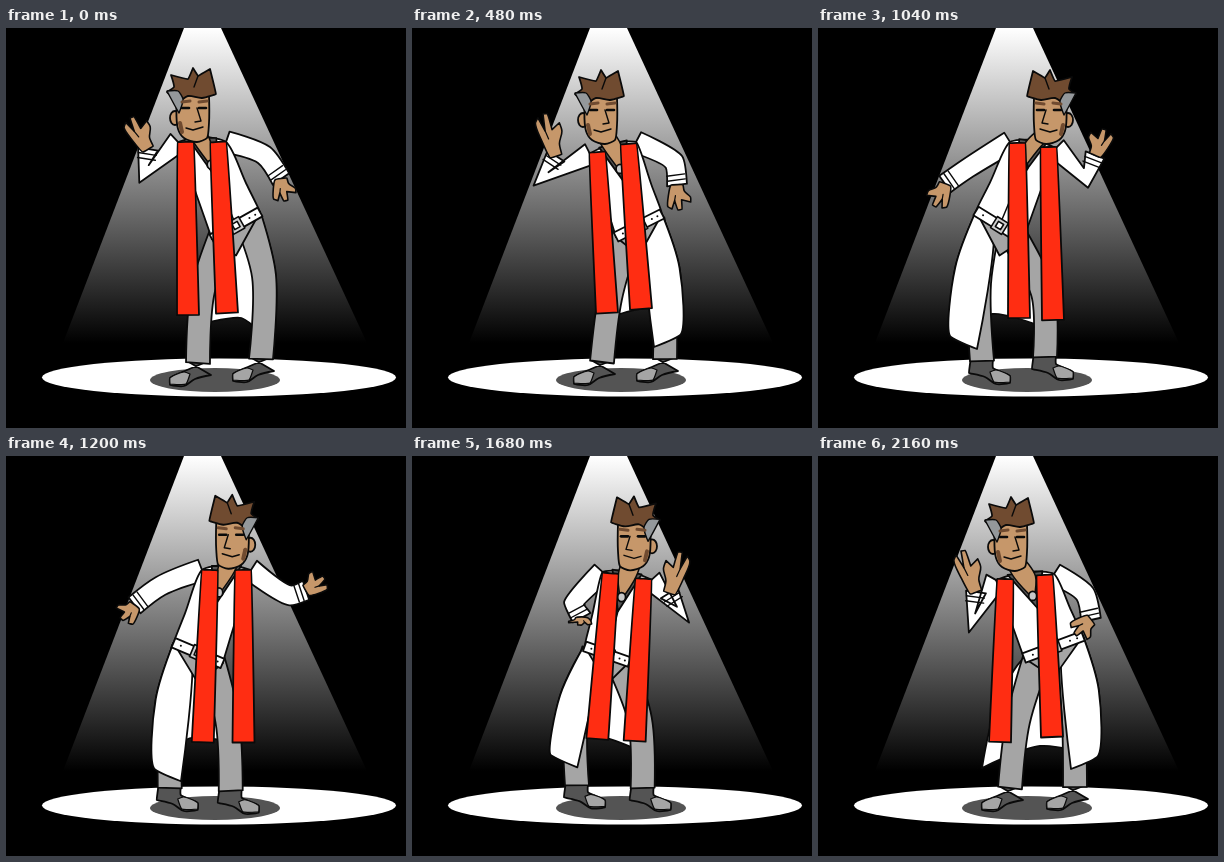
These frames come from a looping animation (400 px wide and 400 px high, 2240 ms). An HTML page with a canvas:

```html
<!DOCTYPE html>
<html lang="en">
<head>
<meta charset="utf-8">
<title>Spotlight dance</title>
<style>
html, body { margin: 0; width: 100%; height: 100%; overflow: hidden; background: #000; }
canvas { display: block; }
</style>
</head>
<body>
<canvas id="stage" width="400" height="400"></canvas>
<script>
const ctx = document.getElementById('stage').getContext('2d');
const STEP = 80, STEPS = 28, AXIS = 208;
const INK = '#0a0a0a', WHITE = '#fff', RED = '#ff2d12', GREY = '#a5a5a5',
  DARK = '#545454', SKIN = '#c6976a', HAIR = '#704b30';

const pts = s => s.split(' ').map(p => p.split(',').map(Number));
const lerp = (a, b, t) => a.map((v, i) => v + (b[i] - v) * t);
const add = (p, x, y) => [p[0] + x, p[1] + y];

// Every joint is a [left, right] pair.
const JOINTS = ['shoulder', 'elbow', 'wrist', 'tip', 'hip', 'knee', 'foot', 'scarf', 'hem'];

function pose(style, head, ...pairs) {
  const p = { style, head };
  JOINTS.forEach((name, i) => p[name] = pts(pairs[i]));
  return p;
}

// face and toe are directions, flap is the side whose coat front hides the leg.
const leanLeft = pose({ face: 1, toe: -1 }, [187, 87],
  '172,114 220,114', '138,146 258,127', '142,121 275,151', '124,90 278,173',
  '206,211 254,184', '197,262 258,248', '192,333 255,329', '182,287 221,285', '203,294 268,318');

const palmLeft = pose({ face: 1, toe: -1, flap: 'R' }, [189, 89],
  '178,126 224,114', '129,151 262,134', '144,128 265,157', '131,86 266,182',
  '204,209 250,186', '198,270 252,270', '190,332 253,329', '195,285 229,281', '204,287 269,306');

const clapRight = pose({ face: 1, toe: 0.6, clap: true }, [211, 81],
  '184,122 236,122', '181,172 237,174', '203,169 213,172', '198,137 206,138',
  '182,203 234,203', '150,248 262,248', '167,328 247,326', '190,292 229,292', '178,312 296,293');

const leanRight = pose({ face: -1, toe: 1, flap: 'L' }, [232, 89],
  '192,114 238,120', '150,140 268,150', '127,156 277,127', '118,179 288,102',
  '158,183 205,212', '161,255 225,265', '164,331 227,327', '201,290 235,292', '132,308 217,296');

const pushRight = pose({ face: -1, toe: 1, flap: 'L' }, [218, 82],
  '196,114 248,114', '162,142 288,136', '182,152 264,148', '200,117 261,106',
  '184,195 236,197', '190,265 228,270', '172,333 227,332', '202,290 248,285', '148,295 238,255');

const clapLeft = pose({ face: -1, toe: 0.7, clap: true }, [212, 84],
  '188,120 242,120', '178,174 239,174', '207,171 228,155', '209,143 241,117',
  '186,199 228,200', '165,248 248,252', '169,324 240,326', '182,287 226,285', '121,283 236,300');

const hipLeft = pose({ face: 1, toe: -1, flap: 'R' }, [193, 88],
  '178,124 236,118', '154,167 267,138', '158,136 273,164', '143,95 256,177',
  '206,202 265,180', '200,265 256,265', '192,330 257,329', '182,286 234,281', '164,312 280,300');

function mix(a, b, t) {
  const out = { style: (t < 0.5 ? a : b).style, head: lerp(a.head, b.head, t) };
  for (const j of JOINTS) out[j] = a[j].map((p, i) => lerp(p, b[j][i], t));
  return out;
}

function flip(p) {
  const mirror = ([x, y]) => [2 * AXIS - x, y];
  const { face, toe, flap, clap } = p.style;
  const style = { face: -face, toe: -toe, clap, flap: flap && (flap === 'L' ? 'R' : 'L') };
  const out = { style, head: mirror(p.head) };
  for (const j of JOINTS) out[j] = p[j].map(mirror).reverse();
  return out;
}

// The same pose with the arms stretched out to the sides.
function reach(p, length) {
  const along = t => p.shoulder.map((s, i) => add(s, (i ? 1 : -1) * length * t, 42 * t));
  return { ...p, elbow: along(0.45), wrist: along(0.8), tip: along(1) };
}

const KEYS = [
  [0, leanLeft],
  [2, reach(mix(leanLeft, flip(pushRight), 0.5), 105)],
  [4, flip(pushRight)],
  [6, palmLeft],
  [9, flip(clapLeft)],
  [10, clapRight],
  [13, leanRight],
  [14, flip(leanLeft)],
  [16, reach(mix(flip(leanLeft), pushRight, 0.5), 100)],
  [18, pushRight],
  [20, flip(palmLeft)],
  [23, clapLeft],
  [24, flip(clapRight)],
  [27, hipLeft],
  [28, leanLeft]
];

function poseAt(step) {
  const i = KEYS.findIndex(k => k[0] > step);
  const [s0, a] = KEYS[i - 1], [s1, b] = KEYS[i];
  return mix(a, b, (step - s0) / (s1 - s0));
}

function paint(fill, width) {
  ctx.fillStyle = fill;
  ctx.fill();
  if (!width) return;
  ctx.lineWidth = width;
  ctx.strokeStyle = INK;
  ctx.stroke();
}

function unit(a, b) {
  const x = b[0] - a[0], y = b[1] - a[1], len = Math.hypot(x, y) || 1;
  return { x: x / len, y: y / len, len };
}

// Closed outline: gentle turns are rounded, sharp ones stay corners.
function shape(p, fill, width = 1.8) {
  const n = p.length, at = i => p[(i + n) % n];
  const tangent = i => {
    const u = unit(at(i - 1), at(i)), v = unit(at(i), at(i + 1));
    const k = Math.max(0, u.x * v.x + u.y * v.y), sum = unit([0, 0], [u.x + v.x, u.y + v.y]);
    return [sum.x * k, sum.y * k];
  };
  ctx.beginPath();
  ctx.moveTo(...p[0]);
  for (let i = 0; i < n; i++) {
    const a = at(i), b = at(i + 1), r = unit(a, b).len / 3, u = tangent(i), v = tangent(i + 1);
    ctx.bezierCurveTo(a[0] + u[0] * r, a[1] + u[1] * r, b[0] - v[0] * r, b[1] - v[1] * r, ...b);
  }
  ctx.closePath();
  paint(fill, width);
}

function line(p, width = 1.5, color = INK) {
  ctx.beginPath();
  p.forEach(q => ctx.lineTo(...q));
  ctx.lineWidth = width;
  ctx.strokeStyle = color;
  ctx.stroke();
}

function oval(x, y, rx, ry, fill, width = 0) {
  ctx.beginPath();
  ctx.ellipse(x, y, rx, ry, 0, 0, 7);
  paint(fill, width);
}

// A strip around a chain of joints, with a half width at each joint.
function limb(chain, halves, fill) {
  const left = [], right = [];
  chain.forEach((p, i) => {
    const u = i ? unit(chain[i - 1], p) : { x: 0, y: 0 };
    const v = i < chain.length - 1 ? unit(p, chain[i + 1]) : { x: 0, y: 0 };
    const d = unit([0, 0], [u.x + v.x, u.y + v.y]), h = halves[i];
    left.push(add(p, -d.y * h, d.x * h));
    right.unshift(add(p, d.y * h, -d.x * h));
  });
  shape([...left, ...right], fill);
}

const beam = ctx.createLinearGradient(0, 0, 0, 315);
beam.addColorStop(0, '#fff');
beam.addColorStop(1, '#000');

function drawStage() {
  ctx.fillStyle = '#000';
  ctx.fillRect(0, 0, 400, 400);
  ctx.beginPath();
  pts('178,0 215,0 361,315 57,315').forEach(q => ctx.lineTo(...q));
  paint(beam);
  oval(213, 349.5, 177, 19, WHITE);
  oval(209, 352, 65, 12, DARK);
}

const FACE = pts('-16,-19 16,-20 16,8 14,23 4,27 -9,23 -15,14');
const MANE = pts('-15,-13 -26,-23 -19,-28 -22,-40 -5,-36 0,-47 5,-39 17,-46 23,-21 9,-17 -5,-19');
const STREAK = pts('-26,-24 -15,-24 -10,-16 -14,-2 -18,-9');

function drawHead([x, y], face) {
  ctx.save();
  ctx.translate(x, y);
  ctx.scale(face, 1);
  oval(-18, 3, 5, 7, SKIN, 1.8);
  shape(FACE, SKIN);
  line(pts('-13,8 -11,17'), 4, HAIR);
  shape(MANE, HAIR);
  line(pts('5,-39 1,-28'), 1.4);
  shape(STREAK, '#94989b', 1.4);
  for (const eye of [-7, 10]) {
    line([[eye - 4, -13], [eye + 4, -14]], 3, HAIR);
    line([[eye - 4, -7], [eye + 3, -7]], 2.6);
  }
  line(pts('4,-7 8,6 2,7'), 1.4);
  line(pts('-7,13 0,15 10,12'), 1.4);
  ctx.restore();
}

function drawCoat(p) {
  const [hl, hr] = p.hip, [bl, br] = p.hem;
  const middle = add(lerp(bl, br, 0.5), 0, p.style.clap ? 10 : -16);
  shape([hl, bulge(p, 0), bl, middle, br, bulge(p, 1), hr], WHITE);
}

const bulge = (p, i) => add(lerp(p.hip[i], p.hem[i], 0.45), i ? 9 : -9, 0);

function drawFlap(p) {
  const i = 'LR'.indexOf(p.style.flap), out = i ? 1 : -1;
  const hip = p.hip[i], hem = p.hem[i];
  shape([lerp(hip, p.hip[1 - i], 0.35), hip, bulge(p, i), hem, add(hem, -27 * out, 13)], WHITE);
}

function drawShoe(foot, toe) {
  const at = (x, y) => add(foot, x * toe, y);
  shape([add(foot, -11, 0), at(-13, 14), at(3, 18), at(14, 25), at(28, 24), at(28, 17), at(11, 9), add(foot, 11, 0)], DARK);
  shape([at(8, 13), at(12, 23), at(28, 23), at(28, 17), at(14, 11)], GREY, 1.2);
}

function drawArm(p, i) {
  limb([p.shoulder[i], p.elbow[i], p.wrist[i]], [11, 10, 10], WHITE);
  drawCuff(p, i);
}

function drawForearm(p, i) {
  limb([p.elbow[i], p.wrist[i]], [9, 9], WHITE);
  drawCuff(p, i);
}

function drawCuff(p, i) {
  const { elbow, wrist } = p, d = unit(elbow[i], wrist[i]), w = 9;
  for (const back of [5, 10]) {
    const c = add(wrist[i], -d.x * back, -d.y * back);
    line([add(c, -d.y * w, d.x * w), add(c, d.y * w, -d.x * w)], 1.4);
  }
}

// x runs from the wrist to the fingertips, y towards the thumb.
const HAND = pts('0,-6 0.4,-9 0.85,-10 0.95,-6 0.62,-3 1,0 0.98,4 0.6,4 0.7,13 0.5,13 0.25,7 0,6');

function drawHand(p, i) {
  const wrist = p.wrist[i], d = unit(wrist, p.tip[i]), side = i ? -1 : 1;
  const place = ([x, y]) => add(wrist, d.x * d.len * x - d.y * y * side, d.y * d.len * x + d.x * y * side);
  shape(HAND.map(place), SKIN, 1.6);
  line([[0.62, -3], [0.42, -2]].map(place), 1.2);
}

function drawTorso(p) {
  const [sl, sr] = p.shoulder, [hl, hr] = p.hip;
  const waist = lerp(hl, hr, 0.5), neck = lerp(sl, sr, 0.5);
  const low = lerp(neck, waist, 0.45), l = lerp(sl, neck, 0.4), r = lerp(sr, neck, 0.4);
  shape([hl, add(waist, 0, 30), hr], GREY);
  shape([sl, lerp(sl, hl, 0.6), hl, hr, lerp(sr, hr, 0.6), sr, add(neck, 0, -5)], WHITE);
  line([low, waist]);
  drawBelt(hl, hr);
  shape([add(l, 0, -4), low, add(r, 0, -4)], DARK);
  shape([add(p.head, -9, 12), add(p.head, 9, 12), lerp(neck, r, 0.6), lerp(neck, low, 0.7), lerp(neck, l, 0.6)], SKIN, 1.5);
  oval(...lerp(neck, low, 0.6), 4, 4.5, '#c8c8c8', 1.8);
}

function drawBelt(l, r) {
  limb([l, r], [5, 5], WHITE);
  for (const t of [0.15, 0.78, 0.9]) oval(...lerp(l, r, t), 1, 1, INK);
  ctx.save();
  ctx.translate(...lerp(l, r, 0.5));
  ctx.rotate(Math.atan2(r[1] - l[1], r[0] - l[0]));
  for (const [size, fill] of [[6.5, '#d0d0d0'], [3, WHITE]]) {
    shape([[-size, -size], [size, -size], [size, size], [-size, size]], fill, 1.6);
  }
  ctx.restore();
}

function drawDancer(p) {
  const { face, toe, flap, clap } = p.style;
  const both = draw => [0, 1].forEach(draw);
  const inset = (pair, i, t) => lerp(pair[i], pair[1 - i], t);
  drawCoat(p);
  both(i => drawShoe(p.foot[i], toe));
  both(i => limb([inset(p.hip, i, 0.25), p.knee[i], add(p.foot[i], 0, 2)], [14, 12, 12], GREY));
  if (flap) drawFlap(p);
  both(i => drawArm(p, i));
  drawTorso(p);
  both(i => limb([inset(p.shoulder, i, 0.16), p.scarf[i]], [8, 11], RED));
  if (clap) both(i => drawForearm(p, i));
  both(i => drawHand(p, i));
  drawHead(p.head, face);
}

function frame() {
  ctx.lineJoin = ctx.lineCap = 'round';
  drawStage();
  drawDancer(poseAt(Math.floor(performance.now() / STEP) % STEPS));
  requestAnimationFrame(frame);
}
frame();
</script>
</body>
</html>
```
